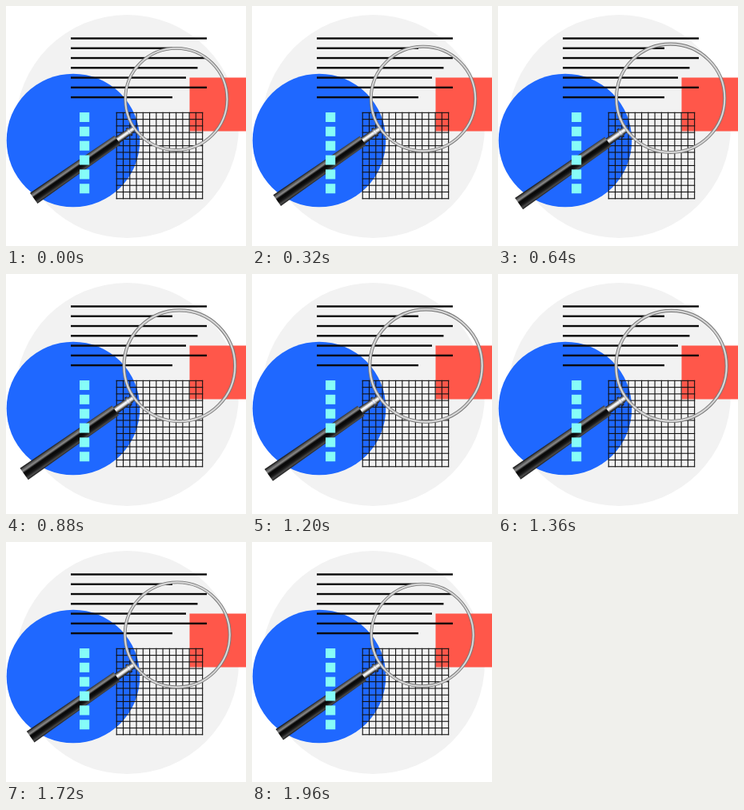
Write an HTML page with a canvas that moves like this. It is 300x300 px and loops after 2 s.

```html
<!DOCTYPE html>
<html>
<head>
<meta charset="utf-8">
<style>
html, body { margin: 0; width: 100%; height: 100%; overflow: hidden; background: #fff; }
canvas { display: block; width: 300px; height: 300px; }
</style>
</head>
<body>
<canvas id="stage" width="300" height="300"></canvas>
<script>
const ctx = document.getElementById('stage').getContext('2d');
const LOOP = 2000, STEP = 40, PEAK = 1130;
const PIVOT = { x: 168, y: 134 }, GROW = 0.109;
const LENS = { x: 212.8, y: 116.4, r: 63.6 }, TILT = 0.608;
const CELLS = 13, GRID = 107.4;

function disc(x, y, r, color) {
  ctx.fillStyle = color;
  ctx.beginPath();
  ctx.arc(x, y, r, 0, Math.PI * 2);
  ctx.fill();
}

function box(x, y, w, h, color) {
  ctx.fillStyle = color;
  ctx.fillRect(x, y, w, h);
}

// Gradient across the handle, from its lower edge to the upper one.
function across(half, colors) {
  const g = ctx.createLinearGradient(0, -half, 0, half);
  colors.forEach((c, i) => g.addColorStop(i / (colors.length - 1), c));
  return g;
}

// Tapered piece of the handle between distances a and b from the lens centre.
function piece(a, b, halfA, halfB, colors) {
  ctx.fillStyle = across(Math.max(halfA, halfB), colors);
  ctx.beginPath();
  ctx.moveTo(a, -halfA);
  ctx.lineTo(b, -halfB);
  ctx.lineTo(b, halfB);
  ctx.lineTo(a, halfA);
  ctx.closePath();
  ctx.fill();
}

function ring(r, width, color) {
  ctx.lineWidth = width;
  ctx.strokeStyle = color;
  ctx.beginPath();
  ctx.arc(0, 0, r, 0, Math.PI * 2);
  ctx.stroke();
}

function backdrop() {
  box(0, 0, 300, 300, '#fff');
  disc(151.5, 150.5, 139.5, '#f2f2f2');
  disc(84, 168, 83.3, '#1f68ff');
  box(229.5, 89.5, 70.5, 67, '#ff574a');
  [251, 208, 251, 239.5, 225, 251, 208].forEach((end, i) =>
    box(81, 39.3 + i * 12.27, end - 81, 2.4, '#0a0a0a'));
  for (let i = 0; i <= CELLS; i++) {
    const d = i * GRID / CELLS;
    box(137.7 + d, 132.8, 1.1, GRID + 1.1, '#111');
    box(137.7, 132.8 + d, GRID + 1.1, 1.1, '#111');
  }
}

function magnifier(scale) {
  ctx.save();
  ctx.translate(PIVOT.x, PIVOT.y);
  ctx.scale(scale, scale);
  ctx.translate(LENS.x - PIVOT.x, LENS.y - PIVOT.y);

  ring(LENS.r, 3.8, '#777');
  ring(LENS.r, 2.2, '#c6c6c6');
  ring(LENS.r + 0.2, 0.8, '#e6e6e6');

  ctx.rotate(Math.PI - TILT);
  const chrome = ['#111', '#444', '#ddd', '#fff', '#777', '#111'];
  piece(65, 70, 3, 4.5, chrome);
  piece(70, 73, 5.8, 5.8, chrome);
  piece(73, 91, 4, 4.6, chrome);
  piece(89.5, 217, 6.8, 8.2,
    ['#1c1c1c', '#4a4a4a', '#1c1c1c', '#0a0a0a', '#0a0a0a', '#8a8a8a', '#555', '#0a0a0a']);
  ctx.restore();
}

// Rises to the peak and falls back, softened at the turns.
function swell(t) {
  const p = t < PEAK ? t / PEAK : (LOOP - t) / (LOOP - PEAK);
  return (p + (1 - Math.cos(p * Math.PI)) / 2) / 2;
}

function draw(ms) {
  const t = Math.floor((ms % LOOP) / STEP) * STEP;
  backdrop();
  magnifier(1 + GROW * swell(t));
  for (let i = 0; i < 6; i++) box(92, 133 + i * 17.85, 12.2, 12, '#86fcf8');
}

const start = performance.now();
function frame() {
  draw(performance.now() - start);
  requestAnimationFrame(frame);
}
frame();
</script>
</body>
</html>
```
